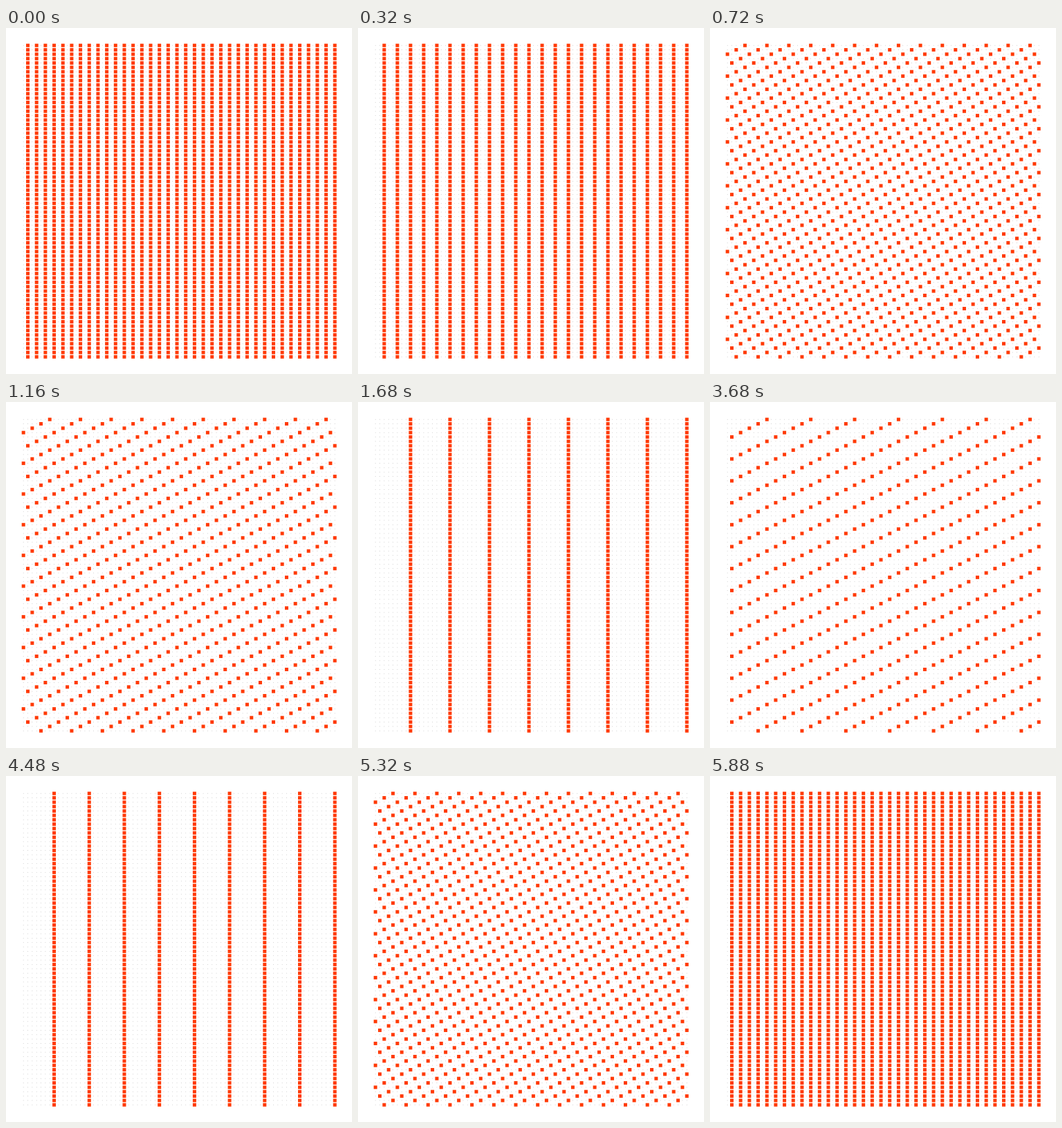
An HTML page with a canvas for the animation above (5.92 s loop, 500 by 500 pixels).

```html
<!DOCTYPE html>
<html lang="en">
<head>
<meta charset="utf-8">
<title>Multiples</title>
<style>
  html, body { margin: 0; width: 100%; height: 100%; overflow: hidden; background: #fff; }
  canvas { display: block; width: 500px; height: 500px; }
</style>
</head>
<body>
<canvas id="stage" width="500" height="500"></canvas>
<script>
  const ctx = document.getElementById('stage').getContext('2d');
  const LOOP = 5920, STEP = 40, START = 60;
  const COUNT = 72, FIRST = 25.2, PITCH = 450 / (COUNT - 1);
  const BIG = 5, SMALL = 0.8;

  // The divisor swings from 2 to 11 and back, rounded to whole numbers.
  function divisorAt(ms) {
    const t = Math.floor(ms / STEP) * STEP;
    const swing = Math.abs(Math.sin(Math.PI * (t - START) / LOOP));
    return Math.round(2 + 9 * swing);
  }

  function square(col, row, size, color) {
    ctx.fillStyle = color;
    ctx.fillRect(FIRST + col * PITCH - size / 2, FIRST + row * PITCH - size / 2, size, size);
  }

  // Cells are numbered row by row from 1; multiples of the divisor light up.
  function draw(divisor) {
    ctx.fillStyle = '#fff';
    ctx.fillRect(0, 0, 500, 500);
    for (let i = 0; i < COUNT * COUNT; i++) {
      const col = i % COUNT, row = Math.floor(i / COUNT);
      if ((i + 1) % divisor === 0) square(col, row, BIG, '#ff3a06');
      else square(col, row, SMALL, '#bbb');
    }
  }

  let shown = 0;
  function tick() {
    const divisor = divisorAt(performance.now() % LOOP);
    if (divisor !== shown) draw(shown = divisor);
    requestAnimationFrame(tick);
  }
  tick();
</script>
</body>
</html>
```
